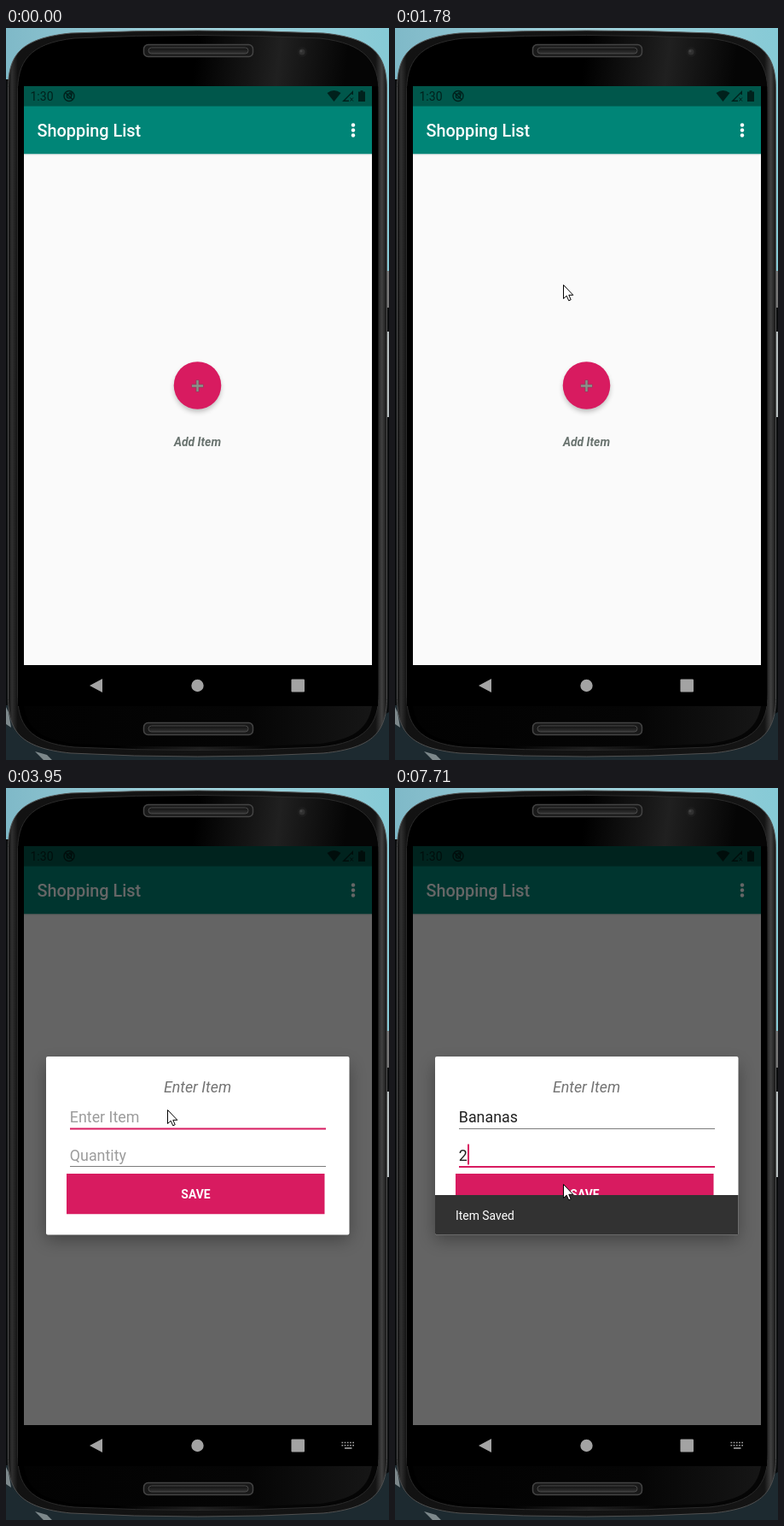
These frames come from a looping animation (449x856 px, 8000 ms). An HTML page:

```html
<!DOCTYPE html>
<html lang="en">
<head>
<meta charset="utf-8">
<title>Shopping List</title>
<style>
html, body { margin: 0; width: 100%; height: 100%; overflow: hidden; background: #000; }
svg { display: block; width: 100%; height: 100%; }
text { font-family: Roboto, sans-serif; }
</style>
</head>
<body>
<svg viewBox="0 0 449 856">
  <defs>
    <linearGradient id="sky" x2="1"><stop stop-color="#7fb9c8"/><stop offset=".5" stop-color="#a4d3dc"/><stop offset="1" stop-color="#86cad6"/></linearGradient>
    <linearGradient id="rim" x2="1"><stop stop-color="#0c0c0c"/><stop offset=".01" stop-color="#303030"/><stop offset=".025" stop-color="#121212"/><stop offset=".97" stop-color="#141414"/><stop offset=".987" stop-color="#404040"/><stop offset="1" stop-color="#141414"/></linearGradient>
    <linearGradient id="sheen" x1=".5" y1="0" x2=".9" y2=".09"><stop stop-color="#000"/><stop offset=".55" stop-color="#202020"/><stop offset="1" stop-color="#050505"/></linearGradient>
    <linearGradient id="chin" x2="1"><stop stop-color="#020202"/><stop offset=".65" stop-color="#050505"/><stop offset="1" stop-color="#161616"/></linearGradient>
    <linearGradient id="slot" x2="0" y2="1"><stop stop-color="#111"/><stop offset="1" stop-color="#333"/></linearGradient>
    <filter id="soft" x="-50%" y="-50%" width="200%" height="200%"><feGaussianBlur stdDeviation="3"/></filter>
    <filter id="deep" x="-20%" y="-20%" width="140%" height="150%"><feGaussianBlur stdDeviation="10"/></filter>
    <clipPath id="screen"><path d="M21 68H429V745H21Z"/></clipPath>
    <clipPath id="card"><rect x="47" y="314" width="355.500" height="208.500" rx="2"/></clipPath>
    <clipPath id="disc"><circle cx="224.500" cy="418" r="27.800"/></clipPath>
    <g id="speaker">
      <rect x="161.500" y=".5" width="128" height="14" rx="5" fill="#191919" stroke="#444" stroke-width="1.500"/>
      <rect x="167" y="4" width="117" height="7" rx="3.500" fill="url(#slot)" stroke="#4a4a4a"/>
    </g>
  </defs>

  <!-- backdrop -->
  <path fill="#0b0d0e" d="M0 0H449V856H0Z"/>
  <path fill="url(#sky)" d="M0 0H449V284H420V60H0Z"/>
  <path fill="#777" d="M446 284H449V327H446Z"/>
  <path fill="#b4bcbd" d="M446 355H449V455H446Z"/>
  <path fill="#1d2a30" d="M0 792H30L90 846H360L449 800V856H0Z"/>
  <path fill="#7d888b" d="M0 794L3 800 6 818 0 814ZM34 846L48 850 54 856H44Z"/>

  <!-- phone -->
  <path fill="url(#rim)" stroke="#505050" d="M2.500 72C2.500 32 16 12 76 6Q225 0 372 6C432 12 446.500 32 446.500 72V782C446.500 822 432 842 372 848Q225 856 76 848C16 842 2.500 822 2.500 782Z"/>
  <path fill="url(#sheen)" stroke="#2a2a2a" d="M13.500 76C13.500 40 26 18 80 12Q225 5 368 12C422 18 437 40 437 76V778C437 814 422 836 368 841Q225 848 80 841C26 836 13.500 814 13.500 778Z"/>
  <path fill="url(#chin)" d="M21 793H429C424 822 404 832 368 837Q225 844 80 837C44 832 26 822 21 793Z"/>
  <use href="#speaker" y="19"/>
  <use href="#speaker" y="812"/>
  <circle cx="347" cy="28" r="6" fill="#1c1c1c"/><circle cx="347" cy="28" r="3.500" fill="#303030"/><circle cx="346" cy="27" r="1.500" fill="#444"/>
  <path d="M14 68H436V793H14Z"/>

  <!-- app -->
  <g clip-path="url(#screen)">
    <path fill="#fafafa" d="M21 68H429V745H21Z"/>
    <path fill="#00574b" d="M21 68H429V92H21Z"/>
    <path fill="#e4e6e5" d="M21 147H429V148.500H21Z"/>
    <path fill="#008577" d="M21 91.500H429V147.300H21Z"/>
    <g fill="#00211c">
      <text x="28.500" y="85" font-size="14">1:30</text>
      <path d="M376.500 76Q384.500 70 392.500 76L384.500 86Z"/>
      <path d="M394 86L407 73V78H405.500V76.500L397.500 84.500H402V86Z"/>
      <path d="M403.500 81.500L407 85.500M407 81.500L403.500 85.500" stroke="#00211c"/>
      <path d="M413 74.500H415.500V73H418.500V74.500H421V86H413Z"/>
    </g>
    <g fill="none" stroke="#00211c" stroke-width="1.400">
      <circle cx="74" cy="79.500" r="6"/><circle cx="74" cy="79.500" r="2.600"/><path d="M70 76L78 83.500M74 76H77V79"/>
    </g>
    <text x="36.500" y="127" font-size="19.850" font-weight="500" fill="#fff">Shopping List</text>
    <g fill="#fff"><circle cx="407" cy="113.500" r="2.200"/><circle cx="407" cy="119.500" r="2.200"/><circle cx="407" cy="125.500" r="2.200"/></g>
    <circle cx="224.500" cy="421.500" r="27" opacity=".27" filter="url(#soft)"/>
    <circle cx="224.500" cy="418" r="27.800" fill="#d81b60"/>
    <circle id="ripple" cx="213" cy="412" fill="#a31449" clip-path="url(#disc)"/>
    <path id="plusEdge" d="M217.500 418.500H231.500M224.500 411.500V425.500" stroke="#5f5458" stroke-width="3.800"/>
    <path id="plus" d="M218 418.500H231M224.500 412V425"/>
    <text x="224.500" y="488.500" font-size="13.900" font-weight="700" font-style="italic" fill="#69736f" text-anchor="middle">Add Item</text>
    <path id="dim" d="M21 68H429V745H21Z"/>
  </g>

  <!-- dialog -->
  <g id="dialog">
    <g clip-path="url(#screen)"><rect x="47" y="324" width="355" height="204" opacity=".34" filter="url(#deep)"/></g>
    <g clip-path="url(#card)">
      <path fill="#fff" d="M47 314H403V523H47Z"/>
      <text x="224.500" y="356" font-size="17.850" font-style="italic" fill="#737373" text-anchor="middle">Enter Item</text>
      <text id="item" x="74.800" y="390.500" font-size="17.850"/>
      <text id="qty" x="74.800" y="435.500" font-size="17.850"/>
      <path id="itemLine"/>
      <path id="qtyLine"/>
      <path id="caret" fill="#d81b60" d="M0 0H2V24H0Z"/>
      <path fill="#d81b60" d="M71 451H373.500V498.300H71Z"/>
      <text x="222.500" y="480" font-size="13.900" font-weight="700" fill="#fff" text-anchor="middle">SAVE</text>
      <g id="snack">
        <path fill="#323232" d="M47 476H403V523H47Z"/>
        <text id="snackText" x="71" y="504.500" font-size="13.900" fill="#fff">Item Saved</text>
      </g>
    </g>
  </g>

  <!-- navigation -->
  <g fill="#a3a3a3">
    <path d="M98 769L113 761V777Z"/><circle cx="224.500" cy="769" r="7.200"/><rect x="334.500" y="761.500" width="15.500" height="15" rx="1"/>
    <g id="keyboard" fill="none" stroke="#a3a3a3" stroke-width="1.600">
      <path d="M393.500 765.500H409M393.500 768.700H409" stroke-dasharray="1.700 1.500"/>
      <path d="M397 772H405.500"/>
    </g>
  </g>
  <path id="cursor" d="M.5 .5V16.500L4.200 13.200 6.700 18.800 9.200 17.700 6.800 12.300H11.800Z" fill="#fff" stroke="#000"/>
</svg>
<script>
const LOOP = 8000;
const el = Object.fromEntries([...document.querySelectorAll('svg [id]')].map(n => [n.id, n]));
const set = (id, attrs) => { for (const k in attrs) el[id].setAttribute(k, attrs[k]); };
const ramp = (t, a, b) => Math.min(1, Math.max(0, (t - a) / (b - a)));
const smooth = p => p * p * (3 - 2 * p);

// Screen refreshes: start, end, number of steps.
const bursts = [[210, 920, 10], [1090, 1860, 11], [1930, 2010, 2], [2160, 2330, 3], [2790, 2870, 2],
  [3250], [3950, 4130, 3], [4650], [4820], [4970], [5140],
  [5600, 6220, 9], [6390, 6780, 6], [6920, 7000, 2], [7320, 7710, 6]];
// Pointer stops: time, x, y.
const stops = [[210, 327, 766], [920, 211.5, 410.5], [1320, 211.5, 410.5], [1700, 200, 307], [1860, 194, 293],
  [1930, 191, 288], [2010, 194.5, 282], [2120, 194.5, 282], [2330, 189, 376], [5640, 189, 376],
  [6060, 196, 413], [6220, 196, 413], [6390, 195, 417], [6780, 196, 461], [6920, 196.5, 462], [7000, 197, 463]];
// Typed text: time, content.
const itemKeys = [[4030, 'Ban'], [4120, 'Bana'], [4810, 'Banan'], [4960, 'Banana'], [5130, 'Bananas']];
const qtyKeys = [[6460, '2']];
// Times at which the caret toggles, starting hidden.
const blinks = [2860, 3940, 4030, 4640, 4810, 5590, 6130, 6990, 7470];

// Time of the latest refresh; a small slack absorbs uneven steps.
function snap(t) {
  let last = 0;
  for (const [a, b = a, n = 1] of bursts) {
    if (t < a) break;
    const gap = n > 1 ? (b - a) / (n - 1) : 1;
    last = a + gap * Math.min(n - 1, Math.floor((t - a) / gap + .12));
  }
  return last;
}

function pointer(t) {
  const i = stops.findIndex(s => s[0] > t);
  if (i < 0) return stops[stops.length - 1].slice(1);
  if (!i) return stops[0].slice(1);
  const [a, x, y] = stops[i - 1], [b, u, v] = stops[i];
  const p = ramp(t, a, b), q = b - a > 200 ? smooth(p) : p;
  return [x + (u - x) * q, y + (v - y) * q];
}

const typed = (keys, t) => keys.reduce((s, [at, text]) => t >= at ? text : s, '');

function field(id, text, hint, y, focused) {
  el[id].textContent = text || hint;
  set(id, { fill: text ? '#212121' : '#9c9c9c' });
  const h = focused ? 2 : 1;
  set(id + 'Line', { d: `M75 ${y}H375V${y + h}H75Z`, fill: focused ? '#d81b60' : '#7c7c7c' });
}

function draw(time) {
  const t = snap(time);
  const [x, y] = pointer(t).map(Math.round);
  set('cursor', { transform: `translate(${x} ${y})`, opacity: t >= 210 ? 1 : 0 });

  const pressed = t >= 1090 && t < 1780;
  set('ripple', { r: pressed ? 6 + 42 * smooth(ramp(t, 1090, 1400)) : 0 });
  set('plus', { stroke: pressed ? '#84c40c' : '#8d9189', 'stroke-width': pressed ? 2.8 : 2.3 });
  set('plusEdge', { opacity: pressed ? 0 : .75 });

  const open = ramp(t, 1790, 1930);
  set('dim', { opacity: .6 * open });
  set('dialog', { opacity: 1 - (1 - open) ** 1.75 });

  const onItem = t >= 2785 && t < 6130, onQty = t >= 6130;
  const item = typed(itemKeys, t), qty = typed(qtyKeys, t);
  field('item', item, 'Enter Item', onItem ? 397.5 : 398, onItem);
  field('qty', qty, 'Quantity', 442, onQty);

  const shown = blinks.filter(b => b <= t).length % 2;
  const text = onQty ? qty : item;
  const width = text ? el[onQty ? 'qty' : 'item'].getComputedTextLength() : 0;
  set('caret', { transform: `translate(${75 + width} ${onQty ? 416.5 : 371.5})`, opacity: shown });
  set('keyboard', { opacity: t >= 3250 ? 1 : 0 });

  const rise = 1 - (1 - ramp(t, 7360, 7650)) ** 3;
  set('snack', { transform: `translate(0 ${47 * (1 - rise)})` });
  set('snackText', { opacity: ramp(t, 7420, 7640) });
}

const start = performance.now();
function tick() {
  draw((performance.now() - start) % LOOP);
  requestAnimationFrame(tick);
}
draw(0);
requestAnimationFrame(tick);
</script>
</body>
</html>
```
